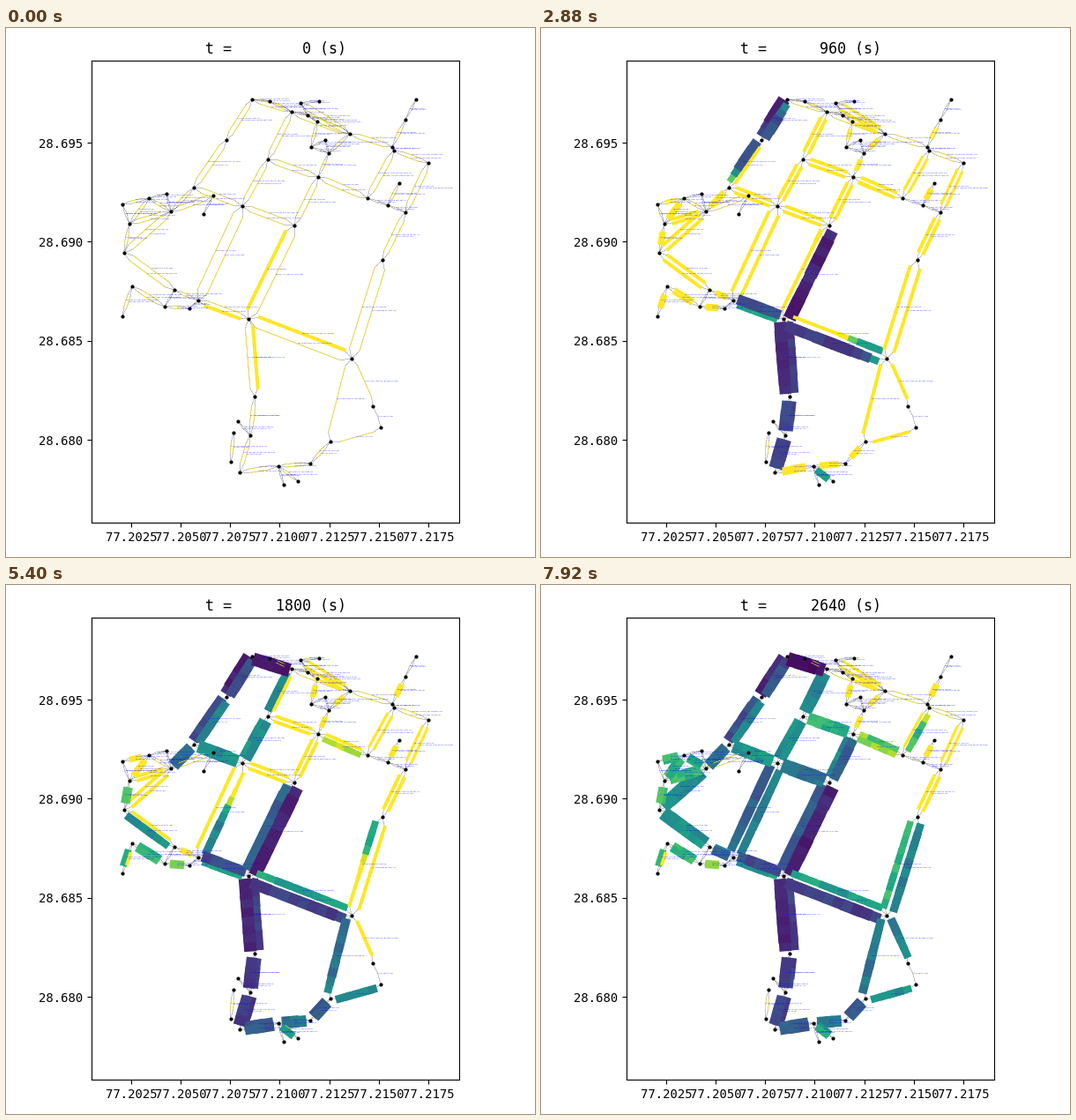
Recreate the animation shown at these times as a matplotlib script. Size 600 by 600 pixels, loop 8 s.

```python
import numpy as np
import matplotlib.pyplot as plt
from matplotlib.animation import FuncAnimation
from matplotlib.collections import LineCollection

plt.rcParams["font.family"] = "DejaVu Sans Mono"

STEP = 120            # simulated seconds per picture
HOLD = 9              # animation frames per picture
FRAMES, INTERVAL = 200, 40
MIN_W, MAX_W = 0.5, 12
CELL = 9              # shortest road cell, in pixels
SPREAD = 4            # seconds a queue needs to grow by one pixel
RISE = 240            # seconds a cell needs to fill up
CENTRE = 31

# junctions in stage pixels
NODES = np.array([
    (279, 81), (299, 83), (334, 85), (355, 83), (324, 95), (342, 99),
    (353, 106), (390, 120), (362, 127), (346, 135), (366, 142), (297, 149),
    (354, 169), (250, 127), (213, 181), (235, 190), (224, 211), (268, 202),
    (327, 224), (182, 188), (162, 193), (132, 200), (187, 208), (140, 222),
    (134, 255), (143, 293), (132, 327), (191, 297), (180, 316), (208, 318),
    (218, 309), (275, 330), (282, 418), (263, 446), (277, 462), (258, 459),
    (255, 492), (265, 504), (309, 497), (315, 518), (331, 514), (345, 494),
    (368, 469), (425, 453), (416, 429), (392, 375), (427, 263), (453, 209),
    (433, 201), (446, 176), (410, 193), (479, 153), (440, 139), (438, 135),
    (453, 104), (465, 81)], float)


class Link:
    """One direction of a road: free flow, then a queue growing upstream."""

    def __init__(self, a, b, free, fill):
        self.free, self.fill = free, 1 if a == CENTRE else fill
        self.start, self.peak = np.inf, free
        self.p, self.vec = NODES[a], NODES[b] - NODES[a]
        self.length = np.hypot(*self.vec)
        self.side = 0.05 * np.array([self.vec[1], -self.vec[0]])  # keep left
        self.n = int(np.clip(self.length / CELL, 2, 11))
        self.pos = (np.arange(1, self.n - 1) + 0.5) / self.n

    def at(self, f):
        return self.p + f * self.vec + self.side

    def outline(self):
        f = 1 / self.n
        return [self.p, self.at(f), self.at(1 - f), self.p + self.vec]

    def cells(self):
        return [(self.at(i / self.n), self.at((i + 1) / self.n))
                for i in range(1, self.n - 1)]

    def density(self, t):
        delay = SPREAD * self.length * (1 - self.pos)
        s = np.clip((t - self.start - delay) / RISE, 0, 1)
        free = self.free * min(1, t / self.fill if t else self.fill == 1)
        return free + (self.peak - free) * s * s * (3 - 2 * s)


links = {}


def pairs(chain):
    ids = [int(w) for w in chain.split()]
    return list(zip(ids, ids[1:]))


def one_way(free, fill, *chains):
    for chain in chains:
        for a, b in pairs(chain):
            links[a, b] = Link(a, b, free, fill)


def two_way(free, fill, *chains):
    for chain in chains:
        one_way(free, fill, chain, " ".join(chain.split()[::-1]))


def jam(start, peak, *chains):
    for chain in chains:
        for pair in pairs(chain):
            links[pair].start, links[pair].peak = start, peak


two_way(0.20, 480, "31 32 34 37 38 41 42", "31 30 17 11 4", "31 18 12 11",
        "31 45 46 47", "18 17 14 13 0", "14 22 24 27 30", "22 23 24", "23 20",
        "12 50", "26 25 28 29", "38 40", "48 49")
one_way(0.20, 480, "43 42 45 44")
two_way(0.15, 720, "47 51", "50 52", "12 10 7 2", "7 5")
two_way(0.20, 1900, "20 21", "55 54 53", "9 6")
two_way(0, 480, "0 4 7 53 52 51", "0 1 4 5 6", "5 2 3", "10 8 9 10",
        "22 15 16", "22 20 19 22", "21 23", "27 28", "29 30", "33 34",
        "35 36", "38 39", "50 48 47")
one_way(0, 480, "44 43")

# morning rush around the centre
jam(60, 0.82, "32 31")
jam(220, 0.48, "31 30")
jam(220, 0.68, "30 31")
jam(290, 0.84, "18 31")
jam(400, 0.73, "45 31", "31 32 34 37", "37 34 32")
jam(640, 0.68, "0 13", "14 13")
jam(640, 0.83, "13 0")
jam(650, 0.47, "31 45", "40 38")
jam(800, 0.37, "50 12", "28 29 28")
jam(820, 0.63, "31 18", "37 38 37")

# it spreads along the outer roads
jam(1050, 0.58, "14 22 14")
jam(1100, 0.42, "23 24 23")
jam(1300, 0.57, "38 41 38", "42 45")
jam(1300, 0.64, "41 42 41")
jam(1400, 0.50, "17 11 17", "11 4", "14 17 14", "27 24", "43 42")
jam(1400, 0.54, "17 30", "13 14")
jam(1400, 0.93, "4 0")
jam(1450, 0.44, "45 46", "26 25 28 25")
jam(1750, 0.54, "46 45 44")
jam(1950, 0.57, "17 18 17", "27 30 27")
jam(1950, 0.44, "11 12 11", "22 20 22", "22 23 22", "23 20 21", "20 23",
    "21 20")
jam(1950, 0.51, "4 11", "18 12", "38 40")
jam(2050, 0.63, "12 18", "30 17")
jam(2200, 0.50, "22 24 22", "24 27")
jam(2300, 0.43, "12 50", "52 50")

roads = list(links.values())


def state(n):
    """Line widths and colours of all cells in picture n."""
    k = np.concatenate([r.density(n * STEP) for r in roads])
    noise = np.random.default_rng(n).uniform(-1, 1, k.shape)
    k = np.clip(k * (1 + 0.07 * noise * (k > 0.3)), 0, 0.97)
    speed = np.minimum(1, 0.5 * (1 / np.maximum(k, 0.01) - 1))
    return MIN_W + k * (MAX_W - MIN_W), plt.colormaps["viridis"](speed)


STATES = [state(n) for n in range((FRAMES - 1) // HOLD + 1)]

fig = plt.figure(figsize=(6, 6), dpi=100)
ax = fig.add_axes([97 / 600, 39 / 600, 417 / 600, 524 / 600])
ax.set_xlim(97, 514)
ax.set_ylim(561, 37)
ax.set_xticks([141.9 + 56.17 * i for i in range(7)],
              [f"{77.2025 + 0.0025 * i:.4f}" for i in range(7)])
ax.set_yticks([467 - 112.33 * i for i in range(4)],
              [f"{28.68 + 0.005 * i:.3f}" for i in range(4)])
title = ax.set_title("")

ax.add_collection(LineCollection([r.outline() for r in roads], colors="k",
                                 linewidths=0.25, linestyles="--", zorder=5),
                  autolim=False)
traffic = LineCollection([c for r in roads for c in r.cells()],
                         capstyle="projecting", zorder=6)
ax.add_collection(traffic, autolim=False)
ax.plot(*NODES.T, "ko", ms=2, zorder=10)

rng = np.random.default_rng(4)
WORDS = ["road", "lane", "street", "way", "link", "east", "north"]
for r in roads:
    name = " ".join(rng.choice(WORDS, rng.integers(4, 9)))
    ax.text(*r.at(0.5), name, color="b", fontsize=1, zorder=20)


def update(frame):
    n = frame // HOLD
    widths, colors = STATES[n]
    traffic.set_linewidths(widths)
    traffic.set_color(colors)
    title.set_text(f"t = {n * STEP:>8} (s)")
    return traffic, title


anim = FuncAnimation(fig, update, frames=FRAMES, interval=INTERVAL,
                     repeat=True, repeat_delay=0, blit=False)
plt.show()
```
